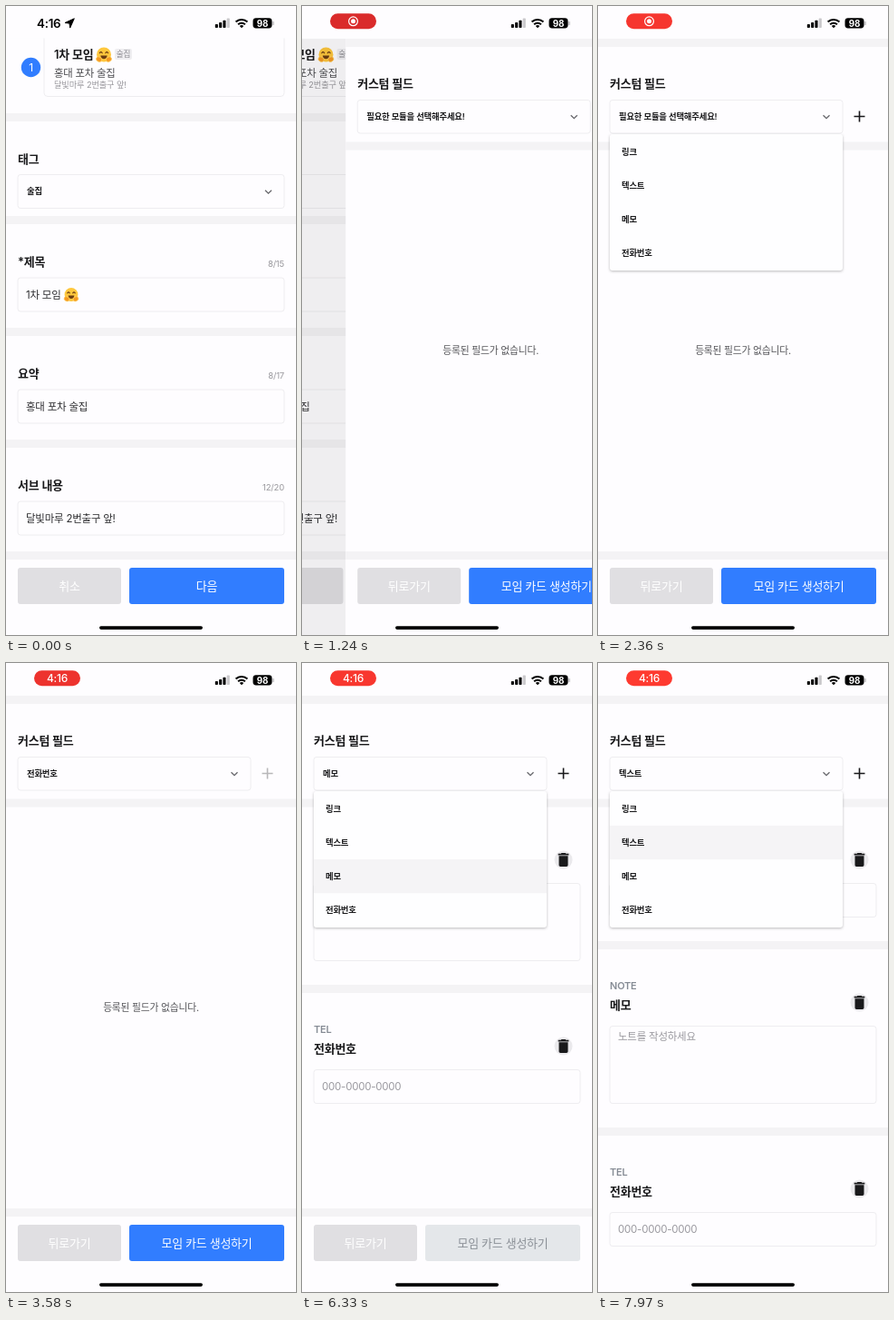
Recreate the animation shown at these times as an HTML page. Size 320 by 692 pixels, loop 8 s.

```html
<!DOCTYPE html>
<html lang="ko">
<head>
<meta charset="utf-8">
<style>
html, body { margin: 0; width: 320px; height: 692px; overflow: hidden; background: #fefdff; }
svg { display: block; }
text { font-family: Inter, "Noto Sans CJK KR", "Noto Sans CJK", "Noto Sans CJK JP", sans-serif; letter-spacing: -.02em; white-space: pre; }
</style>
</head>
<body>
<svg id="stage" width="320" height="692" viewBox="0 0 320 692"></svg>
<script>
const PAPER = '#fefdff', BAND = '#f4f3f5', LINE = '#eeedf0', INK = '#19191b', BLUE = '#317dff';

// Drawing helpers; text is placed by its vertical centre.
const rect = (x, y, w, h, fill, extra = '') =>
  `<rect x="${x}" y="${y}" width="${w}" height="${h}" fill="${fill}" ${extra}/>`;
const text = (x, cy, str, size, fill = INK, weight = 400, anchor = 'start', extra = '') =>
  `<text x="${x}" y="${cy + size * .37}" font-size="${size}" fill="${fill}" font-weight="${weight}" text-anchor="${anchor}" ${extra}>${str}</text>`;
const group = (id, body, extra = '') => `<g id="${id}" ${extra}>${body}</g>`;
const band = y => rect(0, y, 320, 9, BAND);
const box = (y, h = 37, w = 294) => rect(13, y, w, h, PAPER, `rx="3" stroke="${LINE}"`);
const title = (y, str) => text(13, y, str, 13, INK, 600);
const chevron = (x, y) =>
  `<path d="M${x - 3.5} ${y - 1.8}l3.5 3.5l3.5-3.5" fill="none" stroke="#66666b" stroke-width="1.3"/>`;
const button = (x, w, str, fill, ids = ['', '']) =>
  rect(x, 618, w, 40, fill, `rx="3" id="${ids[0]}"`) +
  text(x + w / 2, 638, str, 13, '#fff', 500, 'middle', `id="${ids[1]}"`);
const hug = (x, y, s) => `<g transform="translate(${x} ${y}) scale(${s})">
  <circle r="7.4" fill="#ffc83d"/>
  <path d="M-4.3-1.6q1.3-2 2.6 0M1.7-1.6q1.3-2 2.6 0" fill="none" stroke="#6b3d12" stroke-width="1.1" stroke-linecap="round"/>
  <path d="M-3.4 .9h6.8q-.6 3.5-3.4 3.5t-3.4-3.5z" fill="#6b3d12"/>
  <g fill="#f59a23" stroke="#ffd768" stroke-width=".6"><ellipse cx="-5" cy="4.8" rx="3" ry="2.4" transform="rotate(30 -5 4.8)"/>
  <ellipse cx="5" cy="4.8" rx="3" ry="2.4" transform="rotate(-30 5 4.8)"/></g></g>`;

const input = (y, name, count, value) =>
  title(y, name) + text(307, y + 2, count, 9.5, '#99989d', 400, 'end') +
  box(y + 18) + text(22, y + 36.5, value, 11.5, '#2c2c2f');

const PLACE = '달빛마루 2번출구 앞!';
const detail = rect(0, 0, 320, 692, PAPER) +
  rect(42, 20, 265, 79.5, PAPER, `rx="4" stroke="${LINE}"`) +
  `<circle cx="27.5" cy="67.5" r="10.7" fill="${BLUE}"/>` +
  text(27.5, 67.5, '1', 12, '#fff', 400, 'middle') +
  text(53, 53.5, '1차 모임', 13, INK, 600) + hug(108, 53.5, 1.08) +
  rect(120, 47, 19, 12, '#efeef1', 'rx="2"') + text(129.5, 53, '술집', 8.6, '#8d8c92', 400, 'middle') +
  text(53, 73.5, '홍대 포차 술집', 11.4, '#4a4a4e') + text(53, 87, PLACE, 9.3, '#99989d') +
  [118, 231, 354, 477, 600].map(band).join('') +
  title(168, '태그') + box(185.5) + text(23, 204, '술집', 9.4, INK, 600) + chevron(289.5, 204.5) +
  input(281, '*제목', '8/15', '1차 모임') + hug(72, 317.5, 1) +
  input(404, '요약', '8/17', '홍대 포차 술집') +
  input(527, '서브 내용', '12/20', PLACE) +
  button(13, 114, '취소', '#e0dfe2') + button(136, 171, '다음', BLUE, ['next', '']);

// A form block; its origin is the lower edge of the band above it.
const field = (id, label, name, hint, h, last) => group(id,
  text(13, 40, label, 11, '#868c95', 600) + title(61.5, name) +
  '<circle cx="288.5" cy="58.5" r="10" fill="#ebeaed"/>' +
  `<path transform="translate(278.5 48.5) scale(.833)" fill="${INK}" d="M6 19c0 1.1.9 2 2 2h8c1.1 0 2-.9 2-2V7H6zM19 4h-3.5l-1-1h-5l-1 1H5v2h14z"/>` +
  box(84.5, h) + text(22, 103 - (h > 40 ? 7 : 0), hint, 11.5, '#9a999f') +
  (last ? '' : band(h + 111)));

const OPTIONS = ['링크', '텍스트', '메모', '전화번호'];
const menu = group('menu',
  rect(13, 141, 257, 150, '#fefeff', 'rx="3" style="filter:drop-shadow(0 1px 1.5px #0004)"') +
  rect(13, 0, 257, 37.2, '#f5f4f6', 'id="mark"') +
  OPTIONS.map((s, i) => text(26, 160.5 + 37.1 * i, s, 9.4, INK, 600)).join(''));

const custom = rect(0, 0, 320, 692, PAPER) + band(36) + title(85, '커스텀 필드') +
  box(103.5, 36.5, 257) + text(23, 121.5, '', 9.4, INK, 600, 'start', 'id="value"') + chevron(252, 122) +
  `<path id="plus" d="M282.5 121.5h12M288.5 115.5v12" stroke="${INK}" stroke-width="1.6"/>` + band(149.5) +
  text(160, 379, '등록된 필드가 없습니다.', 10.8, '#555559', 400, 'middle', 'id="empty"') +
  field('textField', 'TEXT', '텍스트', '텍스트를 작성하세요', 37) +
  field('noteField', 'NOTE', '메모', '노트를 작성하세요', 85) +
  field('telField', 'TEL', '전화번호', '000-0000-0000', 37, true) +
  group('footer', rect(0, 600, 320, 92, PAPER) + band(600) + button(13, 114, '뒤로가기', '#e0dfe2') +
    button(136, 171, '모임 카드 생성하기', BLUE, ['create', 'createText'])) + menu;

const status = rect(0, 0, 320, 35.5, PAPER) +
  group('clock', text(34, 19, '4:16', 13.4, '#000', 600) +
    '<path d="M75.3 13.8L65 18.5l5 .6l.7 5z" stroke="#000" stroke-linejoin="round"/>') +
  group('pill', rect(31, 8.3, 51, 17, '#f33', 'rx="8.5" id="pillBack"') +
    group('record', '<circle cx="56.5" cy="16.8" r="4.9" fill="none" stroke="#fff" stroke-width="1.2"/><circle cx="56.5" cy="16.8" r="2.5" fill="#fff"/>') +
    text(56.5, 17, '4:16', 12, '#fff', 500, 'middle', 'id="pillTime"')) +
  [4, 6, 8.2, 10.5].map((h, i) => rect(230.8 + 4.3 * i, 24 - h, 3.1, h, i < 3 ? '#000' : '#c9c8cb', 'rx=".8"')).join('') +
  '<path d="M253.6 17.6a9 9 0 0 1 12.8 0M256.1 20.3a5.6 5.6 0 0 1 7.8 0" fill="none" stroke="#000" stroke-width="2.1"/>' +
  '<path d="M257.8 22a3.2 3.2 0 0 1 4.4 0l-2.2 2.3z"/>' +
  rect(272.5, 13.3, 21, 11.2, '#000', 'rx="3.4"') + rect(294.3, 17, 1.3, 4, '#b5b4b8', 'rx=".6"') +
  text(283, 19, '98', 9.8, '#fff', 700, 'middle') +
  rect(103, 682.3, 114, 3.6, '#000', 'rx="1.8"');

document.getElementById('stage').innerHTML =
  group('detail', detail) + rect(0, 36, 320, 656, '#000', 'id="dim"') + group('custom', custom) + status;

const $ = id => document.getElementById(id);
const show = (id, v) => $(id).setAttribute('opacity', +v);
const move = (id, x, y) => $(id).setAttribute('transform', `translate(${x} ${y})`);
const fill = (id, c) => $(id).setAttribute('fill', c);
const ramp = (t, a, d) => { const p = Math.min(1, Math.max(0, (t - a) / d)); return p * p * (3 - 2 * p); };
const hold = (t, a, b, d) => ramp(t, a, d) - ramp(t, b, d);

// Select sessions: opening time, choosing time, chosen option.
const PICKS = [[2150, 2950, 3], [4420, 4900, 2], [6120, 6640, 1], [7735, 9000, 1]];
const ADDED = [3670, 5480, 7150];
const SLIDE = 1058;

function draw(t) {
  // Page push: critically damped spring with parallax
  const k = Math.max(0, t - SLIDE) * .0184, push = 1 - (1 + k) * Math.exp(-k);
  move('detail', -96 * push, 0);
  move('custom', 320 * (1 - push), 0);
  show('dim', .07 * push);
  show('next', 1 - .68 * ramp(t, 870, 100));

  // Recording pill
  const pill = ramp(t, 240, 260), swap = ramp(t, 2900, 300);
  const glow = .5 - .5 * Math.cos((t - 1050) * Math.PI / 1000);
  show('clock', 1 - pill);
  show('pill', pill);
  show('record', 1 - swap);
  show('pillTime', swap);
  fill('pillBack', `rgb(${215 + 40 * glow},${42 + 16 * glow},${43 + 5 * glow})`);

  // Select value and menu
  let chosen = -1, marked = -1, open = 0;
  for (const [from, to, pick] of PICKS) {
    if (t >= from) marked = t > to - 110 ? pick : chosen;
    if (t >= to) chosen = pick;
    open += ramp(t, from, 200) - ramp(t, to, 180);
  }
  $('value').textContent = OPTIONS[chosen] || '필요한 모듈을 선택해주세요!';
  show('menu', open);
  $('menu').setAttribute('transform',
    `translate(141.5 141) scale(${.75 + .25 * open} ${.56 + .44 * open}) translate(-141.5 -141)`);
  show('mark', marked >= 0);
  $('mark').setAttribute('y', 141.8 + 37.1 * marked);

  // Added blocks push the older ones down
  const [tel, note, txt] = ADDED.map(a => t >= a);
  show('plus', 1 - .7 * ADDED.reduce((s, a) => s + hold(t, a - 150, a, 60), 0));
  show('empty', !tel);
  show('telField', tel);
  show('noteField', note);
  show('textField', txt);
  const noteY = 158 + 157 * txt;
  move('textField', 0, 158);
  move('noteField', 0, noteY);
  move('telField', 0, noteY + 205 * note);
  show('footer', !txt);
  fill('create', tel ? '#e4e7ea' : BLUE);
  fill('createText', tel ? '#8b9097' : '#fff');
}

function tick() {
  draw(performance.now() % 8000);
  requestAnimationFrame(tick);
}
tick();
</script>
</body>
</html>
```
